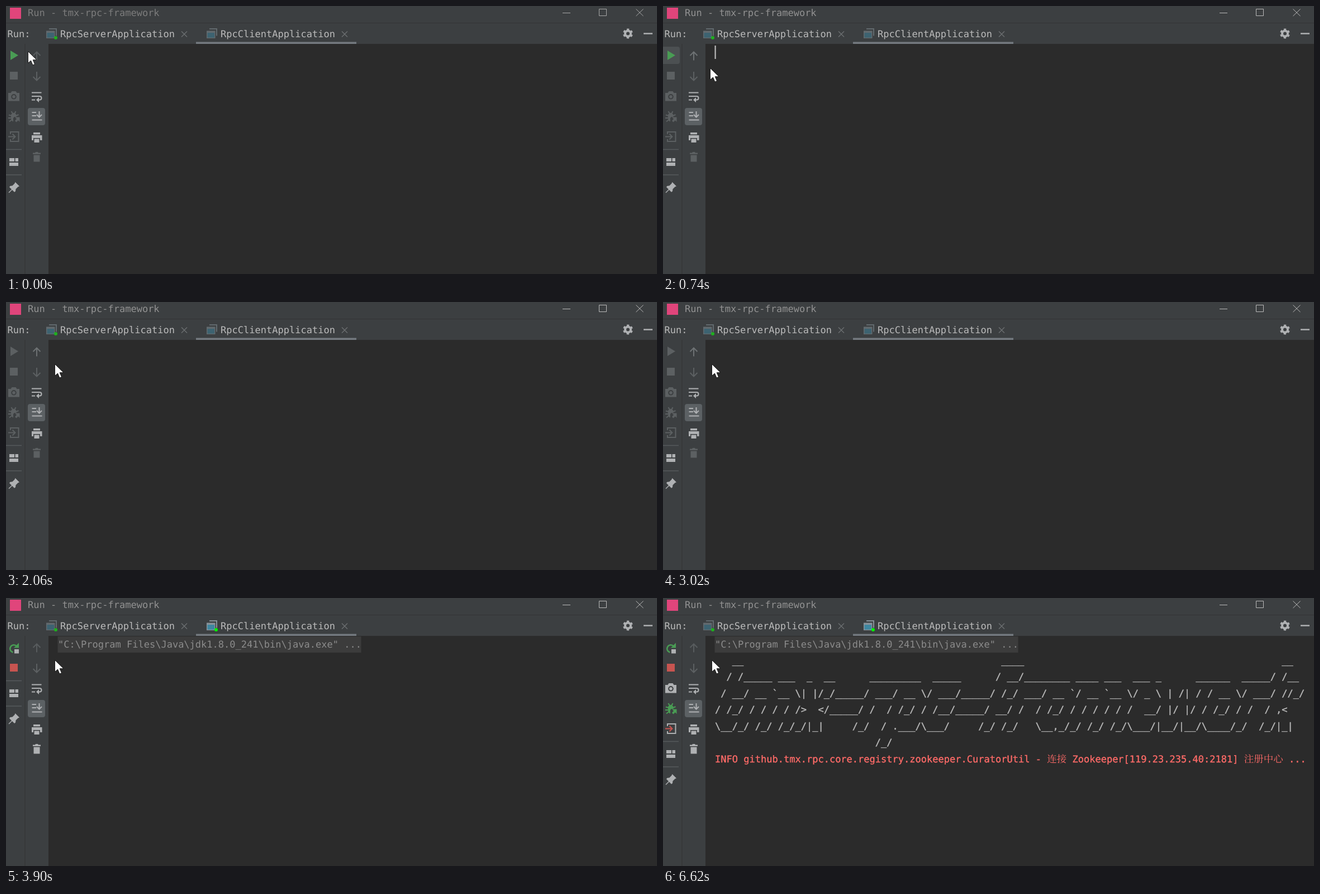
An HTML page that plays this animation: 1165x481 px, repeating every 8 s.

```html
<!DOCTYPE html>
<html lang="en">
<head>
<meta charset="utf-8">
<title>Run console</title>
<style>
  html, body { margin: 0; width: 100%; height: 100%; overflow: hidden; background: #2b2b2b; }
  svg { display: block; width: 1165px; height: 481px; }
  text { font: 17.03px "DejaVu Sans Mono", monospace; white-space: pre; text-rendering: geometricPrecision; color: #bbb; fill: currentColor; }
  .cjk { font: 17.5px "Noto Serif CJK SC", "Noto Sans CJK SC", "Noto Sans CJK", serif; font-weight: 300; stroke: none; }
  .line { fill: none; stroke: currentColor; stroke-width: 2; }
  .fill { fill: currentColor; }
  #title { color: inherit; }
  #command text { color: #8c8c8c; }
  #banner text, #info text { stroke: currentColor; stroke-width: .35px; }
  #info text { color: #ff6b68; }
</style>
</head>
<body>
<svg viewBox="0 0 1165 481">
  <defs>
    <g id="app">
      <path class="fill" d="M5 0H19V13.500H17V2H5Z"/>
      <path class="fill" d="M0 4.500H15.500V18H0Z"/>
      <path fill="var(--pane)" d="M1.500 8H14V16.700H1.500Z"/>
    </g>
  </defs>

  <!-- window frame -->
  <path fill="#3c3f41" d="M0 0H1165V68H76V481H0Z"/>
  <path fill="#323435" d="M0 30H1165V31H0ZM33.500 68H34.500V481H33.500Z"/>
  <rect x="7" y="3" width="20" height="20" fill="#e0457b"/>
  <g id="frame">
    <text id="title" x="39" y="18">Run - tmx-rpc-framework</text>
  </g>
  <g id="buttons" fill="none" stroke="currentColor">
    <path d="M996 12.500H1010M1061.500 5.500H1074.500V17.500H1061.500ZM1127.500 5.500L1140.500 18M1140.500 5.500L1127.500 18"/>
  </g>

  <!-- tabs -->
  <text x="2.500" y="56">Run:</text>
  <use href="#app" x="72" y="40" style="color:#626a6e;--pane:#3d6371"/>
  <circle cx="89" cy="57" r="3" fill="#1fb01f"/>
  <text x="97" y="56">RpcServerApplication</text>
  <use id="client" href="#app" x="359" y="40"/>
  <circle id="dot" cx="376" cy="57" r="3" fill="#00f800"/>
  <text x="384" y="56">RpcClientApplication</text>
  <path d="M314 45.500L324 55.500M324 45.500L314 55.500M601 45.500L611 55.500M611 45.500L601 55.500" stroke="#6c7072" stroke-width="1.300"/>
  <path fill="#747a80" d="M340 64.500H627V68H340Z"/>
  <g fill="none" stroke="#afb1b3">
    <circle cx="1113" cy="49.500" r="5" stroke-width="4"/>
    <circle cx="1113" cy="49.500" r="7.500" stroke-width="3" stroke-dasharray="4 3.854" transform="rotate(-105 1113 49.500)"/>
    <path d="M1141 49.500H1157" stroke-width="2.500"/>
  </g>

  <!-- left tool strip -->
  <rect id="hover" x="-3" y="73" width="33" height="31" rx="4" fill="#4c5052"/>
  <path id="run" class="fill" d="M8 80L22 88.500L8 97Z"/>
  <g id="rerun">
    <path d="M12.500 97.500A6.700 6.700 0 1 1 19 86.500" fill="none" stroke="#499c54" stroke-width="2.600"/>
    <path d="M23 80.500V89.500H14Z" fill="#499c54"/>
    <path d="M15 92H23V99.500H15Z" fill="#afb1b3"/>
  </g>
  <path id="stop" class="fill" d="M7 118H21V132H7Z"/>
  <g id="tools">
    <g id="camera">
      <path class="fill" fill-rule="evenodd" d="M4 156H8.500L10.500 153H17.500L19.500 156H24V170.500H4ZM14 158A4.800 4.800 0 1 0 14 167.600A4.800 4.800 0 1 0 14 158Z"/>
      <circle class="fill" cx="14" cy="162.800" r="2.800"/>
    </g>
    <g id="bug">
      <path class="line" d="M9.500 189L12 193M17.500 189L15.500 193M5 195.500L10 197M4 201H9M6 207.500L10.500 204M18 197L22.500 195"/>
      <path class="fill" d="M9 195Q13.500 188 18.500 195V199H15L13 201V207.500Q9 206 9 201Z"/>
      <path class="fill" d="M16 199.500H24.500V208L21.800 205.300L18.500 208.500L16 206L19 202.700Z"/>
    </g>
    <path id="door" class="line" d="M8 230V226H22.500V243H8V239"/>
    <path id="exit" class="line" d="M4 234.500H16M11.500 229.500L16.500 234.500L11.500 239.500"/>
  </g>
  <g id="tail">
    <path d="M0 257.500H28M0 303H28" stroke="#565a5c" stroke-width="1.500"/>
    <path fill="#afb1b3" d="M6 273H15V279H6ZM16.500 273H22V279H16.500ZM6 281H22V287H6Z"/>
    <path fill="#afb1b3" d="M16.500 316L24 323.500L21.500 324.500L17.500 328.500L17 332.500L15 334L11 330L5.500 335.500L4.500 334.500L10 329L6 325L7.500 323L11.500 322.500L15.500 318.500Z"/>
  </g>

  <!-- right tool strip -->
  <path id="up" class="line" d="M55 97.500V83M48.500 89L55 82.500L61.500 89"/>
  <path class="line" style="color:#5c6062" d="M55 118V133M48.500 127L55 133.500L61.500 127"/>
  <rect x="39" y="183" width="31" height="31" rx="4" fill="#5c6164"/>
  <g class="line" style="color:#afb1b3">
    <path d="M46 155.500H63.500M46 162H60Q63.500 162 63.500 165.200Q63.500 168.500 60 168.500H56M46 168.500H52"/>
    <path d="M46.500 191H54M46.500 197H54M46.500 204.500H64.500M59.500 189V199M55 195L59.500 199.500L64 195"/>
  </g>
  <g fill="#afb1b3">
    <path d="M59 164V173L54 168.500Z"/>
    <path d="M49 227H61V230.500H49ZM46 232H64.500V241H61V237H49V241H46ZM50.500 238.500H59.500V245H50.500Z"/>
  </g>
  <path id="trash" class="fill" d="M48 263.500H52L53 262H57L58 263.500H62V266H48ZM49.500 267.500H60.500V279.500H49.500Z"/>

  <!-- console -->
  <rect id="caret" x="92.500" y="71" width="2.200" height="24" fill="#bbb"/>
  <g id="command">
    <rect x="92.500" y="69" width="543" height="29" fill="#3c3c3c"/>
    <text x="93" y="89">"C:\Program Files\Java\jdk1.8.0_241\bin\java.exe" ...</text>
  </g>
  <g id="banner">
    <text x="93" y="118">   __                                             ____                                             __</text>
    <text x="93" y="147">  / /_____ ___  _  __      _________  _____      / __/________ ____ ___  ___ _      ______  _____/ /__</text>
    <text x="93" y="177"> / __/ __ `__ \| |/_/_____/ ___/ __ \/ ___/_____/ /_/ ___/ __ `/ __ `__ \/ _ \ | /| / / __ \/ ___/ //_/</text>
    <text x="93" y="206">/ /_/ / / / / /&gt;  &lt;/_____/ /  / /_/ / /__/_____/ __/ /  / /_/ / / / / / /  __/ |/ |/ / /_/ / /  / ,&lt;</text>
    <text x="93" y="236">\__/_/ /_/ /_/_/|_|     /_/  / .___/\___/     /_/ /_/   \__,_/_/ /_/ /_/\___/|__/|__/\____/_/  /_/|_|</text>
    <text x="93" y="265">                            /_/</text>
  </g>
  <g id="info">
    <text x="93" y="295">INFO github.tmx.rpc.core.registry.zookeeper.CuratorUtil - <tspan class="cjk">连接</tspan> Zookeeper[119.23.235.40:2181] <tspan class="cjk">注册中心</tspan> ...</text>
  </g>

  <path id="mouse" fill="#fff" stroke="#111" stroke-width=".9" d="M0 0V21L5 16.500L8.400 24.500L12 23L8.700 15.200H15.500Z"/>
</svg>
<script>
  const LOOP = 8000, CLICK = 520, START = 3900, BANNER = 5980, READY = 6620;
  const BLINKS = [520, 1060, 1510, 2060, 2490, 3020, 3470, 3900];
  // time, x, y
  const MOUSE = [[0, 39, 81], [200, 26, 86], [300, 13, 88], [670, 49, 100], [740, 84, 111], [840, 87, 111]];
  const OFF = "#5c6062", GREY = "#afb1b3", GREEN = "#499c54", RED = "#c75450";

  const el = id => document.getElementById(id);
  const show = (id, on) => el(id).style.display = on ? "" : "none";
  const tint = (id, color) => el(id).style.color = color;

  function draw(t) {
    const started = t >= START, ready = t >= READY, focused = t >= CLICK;

    tint("frame", focused ? "#929292" : "#7c7c7c");
    tint("buttons", focused ? "#bbb" : "#a8a8a8");
    tint("client", started ? "#87929a" : "#626a6e");
    el("client").style.setProperty("--pane", started ? "#3e87a1" : "#3d6371");
    show("dot", started);

    show("hover", t >= 200 && t < 840);
    show("run", !started);
    tint("run", t < 1060 ? GREEN : OFF);
    show("rerun", started);
    tint("stop", started ? RED : OFF);
    show("tools", !started || ready);
    tint("camera", ready ? GREY : OFF);
    tint("bug", ready ? GREEN : OFF);
    tint("door", ready ? GREY : OFF);
    tint("exit", ready ? RED : OFF);
    el("tail").setAttribute("transform", `translate(0 ${started && !ready ? -109 : 0})`);
    tint("up", focused && !started ? "#6e7274" : "#585c5e");
    tint("trash", started ? GREY : OFF);

    show("caret", BLINKS.filter(b => b <= t).length % 2);
    show("command", started);
    show("banner", t >= BANNER);
    show("info", ready);

    const [, x, y] = MOUSE.filter(m => m[0] <= t).pop();
    el("mouse").setAttribute("transform", `translate(${x + 0.5} ${y + 0.5})`);
  }

  function tick() {
    draw(performance.now() % LOOP);
    requestAnimationFrame(tick);
  }
  tick();
</script>
</body>
</html>
```
